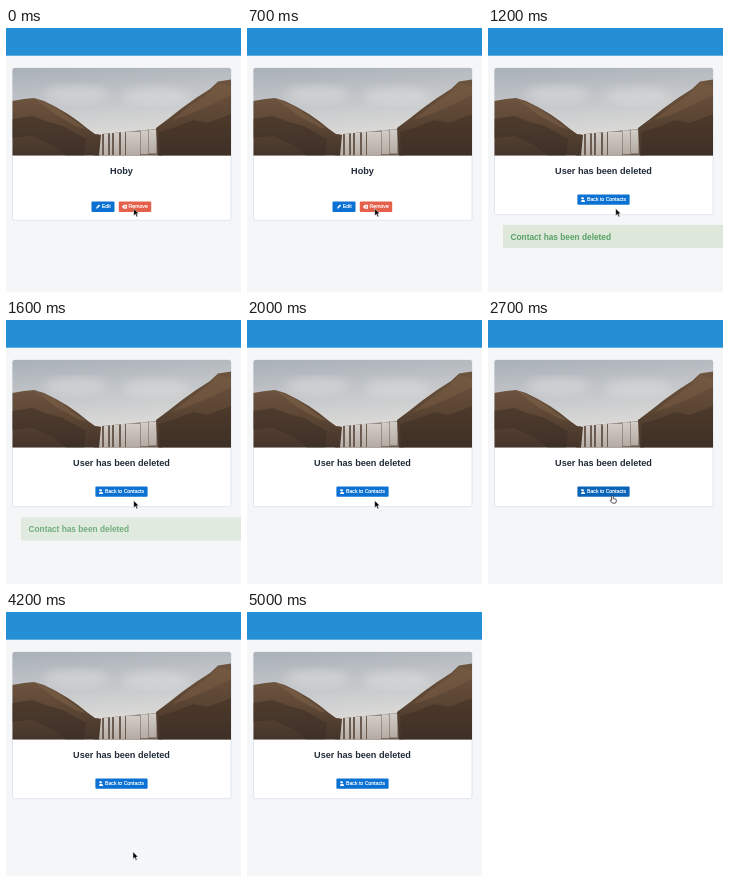
An HTML page that plays this animation: 235x264 px, repeating every 5100 ms.

```html
<!DOCTYPE html>
<html lang="en">
<head>
<meta charset="utf-8">
<title>Delete contact</title>
<style>
html, body { margin: 0; width: 100%; height: 100%; overflow: hidden; background: #f4f6f8; }
svg { display: block; width: 235px; height: 264px; font-family: "Liberation Sans", Arial, sans-serif; }
.title { font-size: 9.15px; font-weight: bold; fill: #202b38; text-anchor: middle; }
.label { font-size: 5.17px; fill: #fff; stroke: #fff; stroke-width: .16; }
.icon { fill: #fff; }
#toast text { font-size: 8.3px; font-weight: bold; fill: #5aa166; }
</style>
</head>
<body>
<svg viewBox="0 0 235 264">
  <defs>
    <linearGradient id="sky" x2=".2" y2="1">
      <stop offset="0" stop-color="#a9b0b8"/>
      <stop offset=".45" stop-color="#c4c7ca"/>
      <stop offset=".8" stop-color="#dad9d7"/>
    </linearGradient>
    <linearGradient id="rock" x2="0" y2="1">
      <stop offset="0" stop-color="#6d543f"/>
      <stop offset=".5" stop-color="#5b4533"/>
      <stop offset="1" stop-color="#43332a"/>
    </linearGradient>
    <linearGradient id="water" x2="0" y2="1">
      <stop offset="0" stop-color="#d3cdc7"/>
      <stop offset="1" stop-color="#b3aaa3"/>
    </linearGradient>
    <filter id="soft"><feGaussianBlur stdDeviation="5"/></filter>
    <clipPath id="frame"><path d="M6.5 127.6V42q0-2 2-2H223q2 0 2 2v85.6z"/></clipPath>
  </defs>

  <rect width="235" height="27.7" fill="#258fd5"/>
  <rect id="card" x="6.5" y="40" width="218.5" rx="2" fill="#fff" stroke="#d8e1eb" stroke-width=".8"/>

  <g clip-path="url(#frame)">
    <rect x="6" y="40" width="219" height="88" fill="url(#sky)"/>
    <g filter="url(#soft)" fill="#e2e1e0" opacity=".45">
      <ellipse cx="70" cy="66" rx="32" ry="9"/>
      <ellipse cx="150" cy="68" rx="34" ry="9"/>
    </g>
    <path d="M88 107L96 106 150 101 156 128H88z" fill="#6b5b50"/>
    <g id="falls" fill="url(#water)"></g>
    <path d="M6 73L18 71 28 70 38 73 50 79 62 86 72 93 82 101 89 106 95 107 93 128H6z" fill="url(#rock)"/>
    <path d="M6 91L26 88 42 94 57 98 69 105 80 111 78 128H60L48 118 26 108 6 110z" fill="#3b2d24" opacity=".5"/>
    <path d="M28 70L50 80 80 101 72 99 50 87z" fill="#80644b" opacity=".5"/>
    <path d="M225 51.5L212 53.5 204 61 190 70 176 80 162 91 150 100 152 128H225z" fill="url(#rock)"/>
    <path d="M153 104L170 99 187 92 202 95 225 86V128H154z" fill="#382a21" opacity=".45"/>
    <path d="M212 55L203 65 184 78 166 92 182 87 205 77 225 67V58z" fill="#7d5f47" opacity=".5"/>
  </g>

  <g id="contact">
    <text class="title" x="115.5" y="145.5">Hoby</text>
    <rect x="85.5" y="173.5" width="23" height="10.5" rx="1" fill="#0b72d3"/>
    <path class="icon" d="M90 180.7l.6-1.8 2.3-2.3 1.2 1.2-2.3 2.3z"/>
    <text class="label" x="95.8" y="180.4">Edit</text>
    <rect x="112.8" y="173.5" width="32.4" height="10.5" rx="1" fill="#e5604a"/>
    <path class="icon" d="M115.8 178.7l2-2h3.2v4h-3.2z"/>
    <path d="M118.4 177.7l1.8 2m0-2l-1.8 2" stroke="#e5604a" stroke-width=".6"/>
    <text class="label" x="122.6" y="180.4">Remove</text>
  </g>

  <g id="deleted">
    <text class="title" x="115.5" y="145.5">User has been deleted</text>
    <rect id="back" x="89.4" y="166.4" width="52.2" height="10.4" rx="1"/>
    <circle class="icon" cx="94.9" cy="170.3" r="1.1"/>
    <path class="icon" d="M93 173.9q0-2.2 2-2.2t2.2 2.2zM93 169.3h.7v1.8H93z"/>
    <text class="label" x="99" y="173.1">Back to Contacts</text>
  </g>

  <g id="toast">
    <rect x="15" y="197" width="222" height="23" fill="#dde8da"/>
    <text x="22.5" y="212">Contact has been deleted</text>
  </g>

  <g id="cursor" stroke-linejoin="round">
    <path id="arrow" d="M0 0V7.2L1.7 5.7 2.9 8.4 4.1 7.9 3 5.2H5.2z" fill="#000" stroke="#fff" stroke-width=".5"/>
    <path id="hand" d="M-1 .6Q0-.5.7.6V3L3.3 3.6Q4 4 3.7 5.7L3 7.5H-.4L-2.4 5Q-2.5 3.8-1 4.6z" fill="#fff" stroke="#111" stroke-width=".7"/>
  </g>
</svg>
<script>
const LOOP = 5100, STEP = 100;
const $ = id => document.getElementById(id);
const show = (id, on) => $(id).setAttribute("display", on ? "inline" : "none");
const move = (id, x, y) => $(id).setAttribute("transform", `translate(${x} ${y})`);
const ramp = (t, from, to) => Math.min(1, Math.max(0, (t - from) / (to - from)));
const ease = p => p * p * (3 - 2 * p);
const mix = (a, b, p) => a + (b - a) * p;

// Falling water: thin strands on the left, a broad sheet on the right
$("falls").innerHTML = [[93, 3], [98, 4], [104, 2], [108, 5], [115, 4], [120, 14], [134.5, 8], [143, 7.5]]
  .map(([x, w]) => `<rect x="${x}" y="${106 - (x - 93) * .09}" width="${w}" height="24"/>`).join("");

function draw(time) {
  const t = Math.floor(time % LOOP / STEP) * STEP;
  const gone = t >= 1000;
  show("contact", !gone);
  show("deleted", gone);
  $("card").setAttribute("height", gone ? 146.7 : 152.3);

  const fade = ease(ramp(t, 1500, 1900));
  $("toast").setAttribute("opacity", ramp(t, 900, 1200) * (1 - fade));
  move("toast", 0, 3 * fade);

  const reach = ease(ramp(t, 2300, 2600));
  const leave = ramp(t, 3700, 4300) ** 2;
  const x = mix(mix(127.7, 124.6, reach), 128, leave);
  const y = mix(mix(180.5, 175.6, reach), 268, leave);
  const over = t >= 2500 && y < 177;
  move("cursor", x, y);
  show("cursor", t < 4400);
  show("hand", over);
  show("arrow", !over);
  $("back").setAttribute("fill", !over ? "#0b72d3" : t < 3300 ? "#0a65b9" : "#11559f");
}

function tick() {
  draw(performance.now());
  requestAnimationFrame(tick);
}
tick();
</script>
</body>
</html>
```
